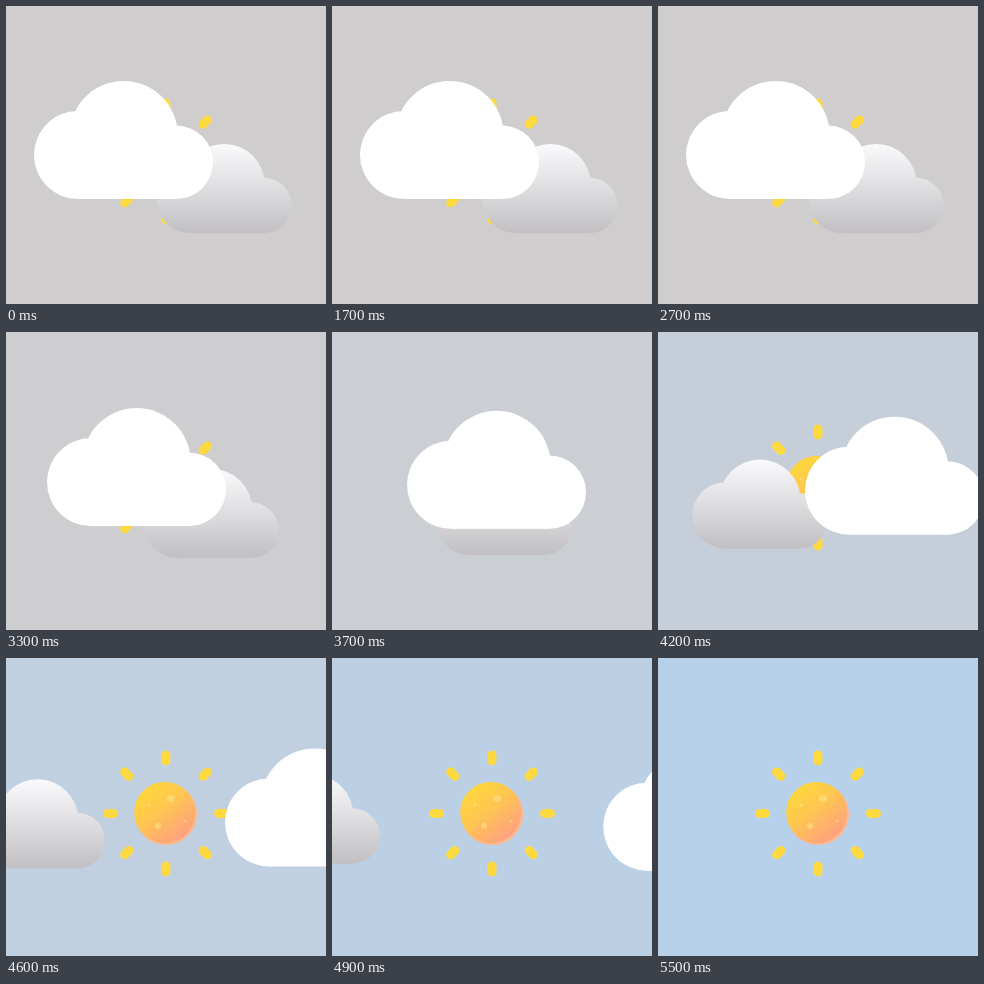
Animation, 320 px wide and 298 px high, one loop 6.3 s. Source, as an HTML page:

```html
<!DOCTYPE html>
<html lang="en">
<head>
<meta charset="utf-8">
<title>Clouds part</title>
<style>
  html, body { margin: 0; width: 100%; height: 100%; overflow: hidden; background: rgb(207, 205, 206); }
  svg { display: block; width: 100vw; height: 100vh; }
</style>
</head>
<body>
<svg viewBox="0 0 320 298">
  <defs>
    <linearGradient id="sunFill" x1=".2" y1=".1" x2=".85" y2=".9">
      <stop offset="0" stop-color="#fed63d"/>
      <stop offset=".4" stop-color="#fec74f"/>
      <stop offset="1" stop-color="#ff9f83"/>
    </linearGradient>
    <linearGradient id="greyFill" gradientUnits="userSpaceOnUse" x1="0" y1="0" x2="0" y2="118">
      <stop offset="0" stop-color="#fafafc"/>
      <stop offset="1" stop-color="#c1bfc2"/>
    </linearGradient>
    <!-- one cloud, 179 x 118, top left at the origin -->
    <g id="cloud">
      <circle cx="44" cy="74" r="44"/>
      <circle cx="89.7" cy="54" r="54"/>
      <circle cx="142.3" cy="81.3" r="36.7"/>
      <rect x="44" y="62" width="98.3" height="56"/>
    </g>
  </defs>

  <g id="rays" fill="#fed940"></g>

  <circle cx="160" cy="156" r="31" fill="#ffb78c"/>
  <circle cx="158.7" cy="154.5" r="30.5" fill="url(#sunFill)"/>
  <g fill="#ffe08a" fill-opacity=".6">
    <ellipse cx="165" cy="140.5" rx="4.2" ry="3.6"/>
    <circle cx="143" cy="147" r="1.8"/>
    <circle cx="152" cy="168" r="3"/>
    <circle cx="179" cy="163" r="1.5"/>
  </g>

  <g id="grey" fill="url(#greyFill)"><use href="#cloud"/></g>
  <g id="white" fill="#fff"><use href="#cloud"/></g>
</svg>
<script>
const LOOP = 6300, STEP = 100, END = 300;
const GREY_SKY = [207, 205, 206], BLUE_SKY = [184, 209, 234];

// time in ms, shift in px, speed in px/ms
const path = [
  [2900, 0, 0],
  [3300, 13, .059],
  [3700, 47, .111],
  [4200, 119, .163],
  [4600, 191, .175],
  [5000, 258, .135],
  [5500, END, 0]
];

const $ = id => document.getElementById(id);

for (let i = 0; i < 8; i++) {
  const ray = document.createElementNS('http://www.w3.org/2000/svg', 'rect');
  const attrs = { x: -4.5, y: -63, width: 9, height: 15, rx: 4.5,
                  transform: `translate(160 155.4) rotate(${i * 45})` };
  for (const key in attrs) ray.setAttribute(key, attrs[key]);
  $('rays').append(ray);
}

// cubic Hermite curve through the path
function shiftAt(t) {
  if (t <= path[0][0]) return 0;
  const i = path.findIndex(p => p[0] > t);
  if (i < 0) return END;
  const [t0, x0, v0] = path[i - 1], [t1, x1, v1] = path[i];
  const d = t1 - t0, u = (t - t0) / d, w = 1 - u;
  return x0 * w * w * (1 + 2 * u) + x1 * u * u * (3 - 2 * u)
       + d * u * w * (v0 * w - v1 * u);
}

function place(id, x, y, scale) {
  $(id).setAttribute('transform', `translate(${x} ${y}) scale(${scale})`);
}

function draw(now) {
  const t = Math.floor((now % LOOP) / STEP) * STEP;
  const s = shiftAt(t);
  place('white', 28 + s, 75 + s * .081, 1);
  place('grey', 150.5 - s * .977, 138 - s * .088, .755);
  const sky = GREY_SKY.map((c, i) => Math.round(c + (BLUE_SKY[i] - c) * s / END));
  document.body.style.background = `rgb(${sky})`;
}

function tick() {
  draw(performance.now());
  requestAnimationFrame(tick);
}
tick();
</script>
</body>
</html>
```
